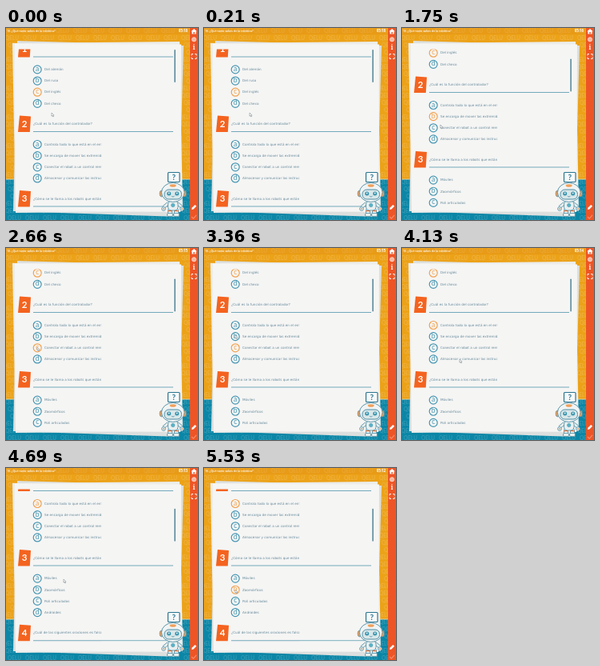
An HTML page with a canvas that plays this animation: 240 by 240 pixels, repeating every 5600 ms.

```html
<!DOCTYPE html>
<html lang="es">
<head>
<meta charset="utf-8">
<style>
html, body { margin: 0; width: 100%; height: 100%; overflow: hidden; background: #eca218; }
canvas { display: block; width: 240px; height: 240px; }
</style>
</head>
<body>
<canvas id="stage"></canvas>
<script>
const LOOP = 5600;
const RED = '#ee5526', ORANGE = '#eca218', TAG = '#f4631f', BLUE = '#0b86a6';
const TEAL = '#4696b2', INK = '#64899a', NAVY = '#2b7590', PICKED = '#f3a250';
const canvas = document.getElementById('stage');
const ctx = canvas.getContext('2d');
const ratio = window.devicePixelRatio || 1;
canvas.width = canvas.height = 240 * ratio;

const quiz = [
  ['', 'Del alemán', 'Del ruso', 'Del inglés', 'Del checo'],
  ['¿Cuál es la función del controlador?', 'Controla todo lo que está en el entorno',
    'Se encarga de mover las extremidades', 'Conectar el robot a un control remoto',
    'Almacenar y comunicar las instrucciones'],
  ['¿Cómo se le llama a los robots que están fijos?', 'Móviles', 'Zoomórficos',
    'Poli articulados', 'Androides'],
  ['¿Cuál de las siguientes oraciones es falsa?']
];
// time, question, option
const clicks = [[0, 0, 2], [1300, 1, 1], [2300, 1, 2], [3700, 1, 0], [5300, 2, 1]];
// time, x, y
const pointer = [[0, 57, 106], [770, 57, 106], [1100, 39, 110], [1450, 39, 110],
  [1750, 48, 121], [2150, 39, 124], [3150, 39, 124], [3550, 39, 96], [3800, 39, 96],
  [4130, 72, 139], [4830, 72, 139], [5220, 39, 152], [5600, 39, 152]];

const ease = (t, start, length) => {
  const p = Math.min(1, Math.max(0, (t - start) / length));
  return p * p * (3 - 2 * p);
};

function paint(fill, stroke, line = 1) {
  if (fill) { ctx.fillStyle = fill; ctx.fill(); }
  if (stroke) { ctx.strokeStyle = stroke; ctx.lineWidth = line; ctx.stroke(); }
}

function box(x, y, w, h, fill, r = 0, stroke, line) {
  ctx.beginPath();
  ctx.roundRect(x, y, w, h, r);
  paint(fill, stroke, line);
}

function shape(points, fill, stroke, line, open) {
  ctx.beginPath();
  points.forEach(([x, y]) => ctx.lineTo(x, y));
  if (!open) ctx.closePath();
  paint(fill, stroke, line);
}

function oval(x, y, rx, ry, fill, stroke, line) {
  ctx.beginPath();
  ctx.ellipse(x, y, rx, ry, 0, 0, 7);
  paint(fill, stroke, line);
}

const disc = (x, y, r, fill, stroke, line) => oval(x, y, r, r, fill, stroke, line);

function label(str, x, y, color, font, align = 'left') {
  ctx.font = font;
  ctx.fillStyle = color;
  ctx.textAlign = align;
  ctx.textBaseline = 'middle';
  ctx.fillText(str, x, y);
}

function drawBackground() {
  box(0, 0, 240, 240, ORANGE);
  box(0, 189, 240, 51, BLUE);
  box(0, 188.6, 230, 0.8, '#dccf9a');
  ctx.globalAlpha = 0.16;
  for (let y = 4; y < 242; y += 9)
    for (let x = -4; x < 230; x += 22)
      label('QELU', x + (y % 4) * 3, y, '#fff', 'bold 6.5px Lato, sans-serif');
  ctx.globalAlpha = 1;
  // loose sheets of paper
  shape([[14, 16], [222, 22], [216, 236], [9, 229]], '#dcdfde');
  shape([[8, 19], [217, 17], [221, 229], [12, 231]], '#ecedeb');
  shape([[11, 19.5], [219, 20.5], [218, 230], [12, 228]], '#f5f5f4');
}

function drawQuestion([title, ...options], i, picked) {
  const y = 26.4 + 93.6 * i;
  shape([[17, y - 10.5], [31, y - 9.5], [29.8, y + 10], [15, y + 10]], TAG);
  label(i + 1, 23, y + 0.2, '#fff', 'bold 11.5px Lato, sans-serif', 'center');
  box(34, y + 9, 175, 1, '#74a9bb');
  const font = '4.15px "DejaVu Sans", sans-serif';
  label(title, 34, y + 0.1, INK, font);
  options.forEach((option, j) => {
    const oy = y + 25.5 + 14.15 * j;
    const color = picked === j ? PICKED : TEAL;
    disc(39.2, oy, 5, '#f5f5f4', color, 1.2);
    label('abcd'[j], 39.2, oy - 0.5, color, '8.5px Lato, sans-serif', 'center');
    label(option, 48, oy + 0.2, INK, font);
  });
}

function drawQuiz(t) {
  const scroll = 49 * ease(t, 280, 280) + 52 * ease(t, 4270, 280);
  const picked = [];
  clicks.forEach(([at, q, option]) => { if (t >= at) picked[q] = option; });
  ctx.save();
  ctx.beginPath();
  ctx.rect(13, 26.5, 197, 200);
  ctx.clip();
  ctx.translate(0, -scroll);
  quiz.forEach((q, i) => {
    ctx.save();
    ctx.beginPath();
    ctx.rect(13, 93.6 * i + 10, 106.2, 94);
    ctx.rect(119, 93.6 * i + 34, 91, 3);
    ctx.clip();
    drawQuestion(q, i, picked[i]);
    ctx.restore();
  });
  ctx.restore();
  box(210.3, 27 + scroll * 0.235, 1.6, 41, '#5f8b9c', 0.8);
}

function drawRobot() {
  const line = '#4f8da3', pale = '#e9efef';
  box(202.5, 180.5, 14.5, 12, '#f7f9f9', 1, NAVY, 1.2);
  shape([[207, 192.5], [210, 196], [212, 192.5]], '#f7f9f9', NAVY, 0.8);
  label('?', 209.8, 186.6, NAVY, 'bold 10px Lato, sans-serif', 'center');
  // legs, arms, body
  [202.5, 210.5].forEach(x => {
    box(x, 226, 5, 7, pale, 1.5, line, 0.8);
    box(x - 1, 231.5, 7, 4, pale, 1.5, line, 0.8);
    box(x, 228, 5, 1.2, TAG);
  });
  [[203, 219, 197, 224], [214, 219, 220, 224]].forEach(([x, y, hx, hy]) => {
    shape([[x, y], [hx, hy]], null, line, 4.2, true);
    shape([[x, y], [hx, hy]], null, pale, 2.8, true);
    disc(hx, hy + 2, 2.4, pale, line, 0.8);
    disc(hx, hy + 2, 1, '#f0a05c');
  });
  box(202.5, 216, 12.5, 12, pale, 4, line, 0.8);
  disc(208.7, 221.5, 2.2, '#55b5cb', line, 0.5);
  // head
  [194.5, 223].forEach(x => oval(x, 207, 2.4, 4, '#f0a05c', line, 0.7));
  oval(208.7, 205.5, 14.3, 12, '#f0f4f4', line, 0.9);
  oval(208.7, 197, 4, 1.8, '#f0a05c');
  box(198, 202, 21.5, 12, '#d9e7e9', 5.5, line, 1);
  [203.7, 213.7].forEach(x => {
    disc(x, 207, 2.5, '#3793ad');
    disc(x, 206.5, 0.9, '#e8f8fa');
  });
  ctx.beginPath();
  ctx.arc(208.7, 209, 2, 0.4, 2.7);
  paint(null, line, 0.8);
}

function drawBars(t) {
  box(0, 0, 230, 8, 'rgba(222, 140, 20, 0.3)');
  box(230, 0, 10, 240, RED);
  label('10. ¿Qué tanto sabes de la robótica?', 1, 3.8, '#fff', '600 3.5px "Open Sans", sans-serif');
  const seconds = 18 - Math.floor((t + 500) / 1000);
  label('05:' + String(seconds).padStart(2, '0'), 227, 4, '#fff', 'bold 4.4px "Open Sans", sans-serif', 'right');

  // home, settings, info, full screen
  shape([[231.3, 4.3], [235, 1], [238.7, 4.3], [237.6, 4.3], [237.6, 7.5], [232.4, 7.5], [232.4, 4.3]], '#fff');
  box(234.3, 5, 1.5, 2.5, RED);
  disc(235, 14.3, 2.6, '#f9b8a2', '#fbd3c5', 0.9);
  label('i', 235, 25, '#fff', 'bold 8px "Noto Serif", serif', 'center');
  for (const sx of [-1, 1])
    for (const sy of [-1, 1])
      shape([[235 + sx, 35.5 + 3 * sy], [235 + 3 * sx, 35.5 + 3 * sy], [235 + 3 * sx, 35.5 + sy]], null, '#fff', 1, true);

  // pencil, check
  shape([[232, 227], [232.6, 224.6], [236.2, 221], [238, 222.8], [234.4, 226.4]], '#fff');
  shape([[232, 236], [234.2, 238.2], [238, 233.8]], null, '#f58d6c', 1.1, true);
}

function drawPointer(t) {
  const k = pointer.findIndex(p => p[0] > t);
  const [t0, x0, y0] = pointer[k - 1], [t1, x1, y1] = pointer[k];
  const p = ease(t, t0, t1 - t0);
  ctx.save();
  ctx.translate(x0 + (x1 - x0) * p, y0 + (y1 - y0) * p);
  shape([[0, 0], [0, 4.2], [1, 3.3], [1.8, 5], [2.6, 4.6], [1.8, 3], [3.1, 3]], '#fff', '#6c7b82', 0.5);
  ctx.restore();
}

function frame(now) {
  const t = now % LOOP;
  ctx.setTransform(ratio, 0, 0, ratio, 0, 0);
  drawBackground();
  drawQuiz(t);
  drawRobot();
  drawBars(t);
  drawPointer(t);
  requestAnimationFrame(() => frame(performance.now()));
}
frame(performance.now());
</script>
</body>
</html>
```
